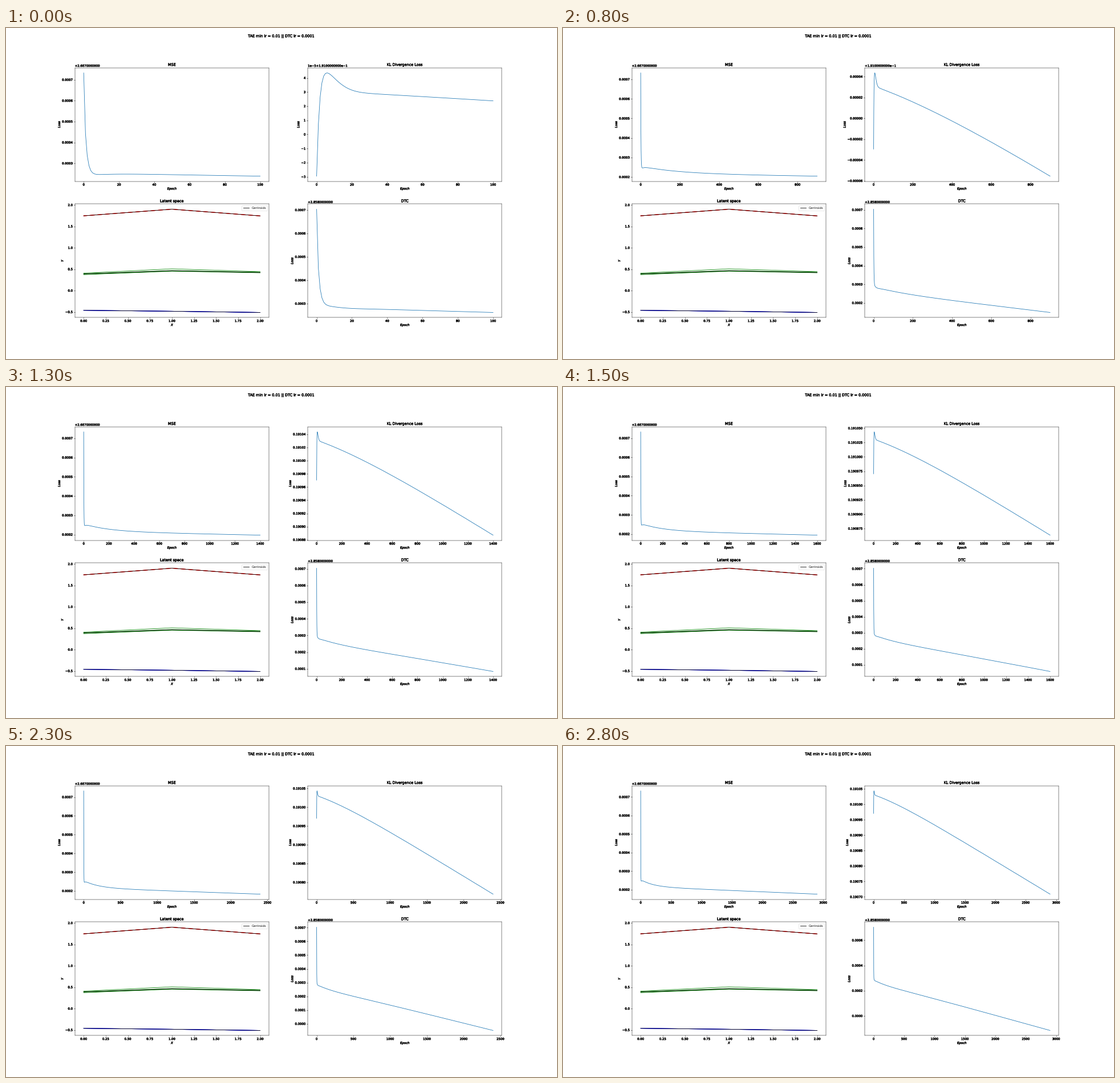
A matplotlib script for the animation above (2.9 s loop, 966 by 580 pixels).

```python
import numpy as np
import matplotlib.pyplot as plt
from matplotlib.animation import FuncAnimation
from matplotlib.patheffects import withStroke
from matplotlib.ticker import ScalarFormatter

WIDTH, HEIGHT, DPI = 966, 580, 38.64
FRAMES, INTERVAL, EPOCHS_PER_FRAME = 29, 100, 100

plt.rcParams.update({
    "font.family": "DejaVu Sans",
    "text.hinting": "no_hinting",
    "xtick.major.width": 1.0,
    "ytick.major.width": 1.0,
    "axes.linewidth": 0.9,
})
HEAVY = [withStroke(linewidth=0.9, foreground="black")]


class LongOffsetFormatter(ScalarFormatter):
    """Scalar formatter whose offset keeps ten decimals."""

    def format_data(self, value):
        exp = int(np.floor(np.log10(abs(value))))
        base = round(value / 10**exp, 10)
        text = "%d" % base if base % 1 == 0 else "%1.10f" % base
        if exp:
            text += "e%d" % exp
        return self.fix_minus(text)


def mse_loss(e):
    trend = 2.166 - 1.4e-4 * e + 0.385 * np.exp(-e / 200)
    start = 3.95 * 0.49**e + 0.99 * 0.1**e - 0.16 * np.exp(-e / 12)
    return 2.667 + 1e-4 * (trend + start)


def kl_loss(e):
    trend = 3.02 - 0.01195 * e + 2.53 * (1 - np.exp(-e / 450))
    trend = trend + 0.08 * np.exp(-e / 200)
    bump = np.exp(0.8 - 0.037 * e - 0.0045 * e**2) - 8.28 * 0.545**e
    return 0.191 + 1e-5 * (trend + bump)


epochs = np.arange(FRAMES * EPOCHS_PER_FRAME + 1, dtype=float)
mse, kl = mse_loss(epochs), kl_loss(epochs)

fig, ((ax_mse, ax_kl), (ax_latent, ax_dtc)) = plt.subplots(
    2, 2, dpi=DPI, facecolor="white",
    figsize=((WIDTH + 1e-4) / DPI, (HEIGHT + 1e-4) / DPI))
fig.subplots_adjust(left=0.125, right=0.9, bottom=0.125, top=0.88,
                    wspace=0.2, hspace=0.2)
fig.suptitle("TAE min lr = 0.01 || DTC lr = 0.0001", fontsize=12,
             path_effects=HEAVY)


def label_axes(ax, title, xlabel, ylabel):
    ax.set_title(title, fontsize=12, path_effects=HEAVY)
    ax.set_xlabel(xlabel, style="italic", path_effects=HEAVY)
    ax.set_ylabel(ylabel, style="italic", path_effects=HEAVY)


def embolden_ticks(ax):
    for axis in (ax.xaxis, ax.yaxis):
        for text in axis.get_majorticklabels() + [axis.get_offset_text()]:
            text.set_path_effects(HEAVY)


curves = []
for ax, title, loss in ((ax_mse, "MSE", mse),
                        (ax_kl, "KL Divergence Loss", kl),
                        (ax_dtc, "DTC", mse + kl)):
    label_axes(ax, title, "Epoch", "Loss")
    ax.yaxis.set_major_formatter(LongOffsetFormatter())
    line, = ax.plot([], [], color="#1f77b4", lw=1.5)
    curves.append((ax, line, loss))

# Latent space: members of each cluster, then the centroids on top.
label_axes(ax_latent, "Latent space", "X", "Y")
steps = [0, 1, 2]
clusters = [
    ("red", [[1.747, 1.902, 1.745]] * 3),
    ("green", [[0.408, 0.508, 0.443], [0.393, 0.468, 0.428],
               [0.386, 0.460, 0.422], [0.372, 0.453, 0.416]]),
    ("blue", [[-0.461, -0.483, -0.511]] * 3),
]
for color, members in clusters:
    for ys in members:
        ax_latent.plot(steps, ys, color=color, lw=1.5)
centroids = [[1.747, 1.902, 1.745], [0.390, 0.464, 0.424],
             [-0.461, -0.483, -0.511]]
for i, ys in enumerate(centroids):
    ax_latent.plot(steps, ys, color="black", lw=1.5,
                   label="Centroids" if i == 0 else None)
ax_latent.legend(loc="upper right")
embolden_ticks(ax_latent)


def update(frame):
    count = (frame + 1) * EPOCHS_PER_FRAME + 1
    for ax, line, loss in curves:
        line.set_data(epochs[:count], loss[:count])
        ax.relim()
        ax.autoscale_view()
        embolden_ticks(ax)
    return [line for _, line, _ in curves]


anim = FuncAnimation(fig, update, frames=FRAMES, interval=INTERVAL,
                     init_func=lambda: update(0), repeat=True,
                     repeat_delay=0, blit=False)
plt.show()
```
